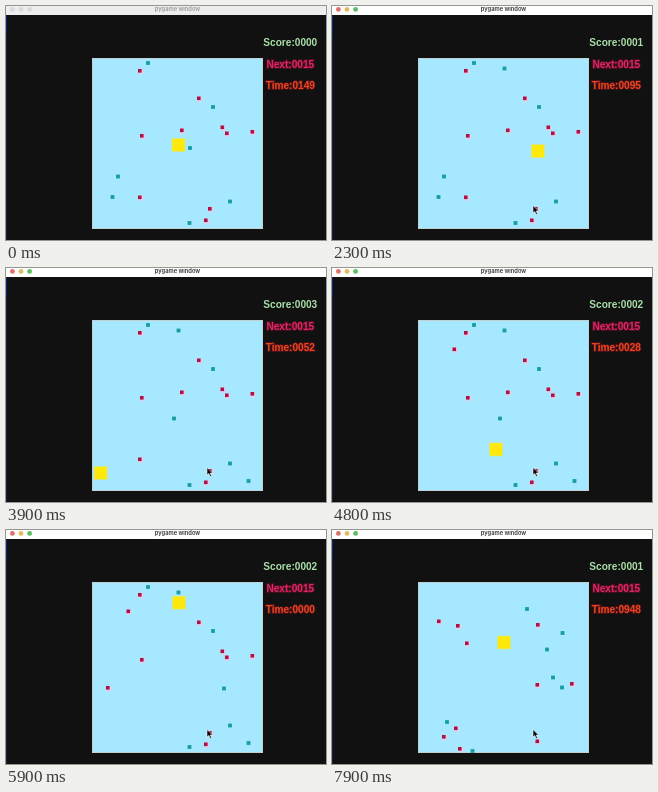
An HTML page that plays this animation: 320 by 234 pixels, repeating every 8 s.

```html
<!DOCTYPE html>
<html lang="en">
<head>
<meta charset="utf-8">
<title>pygame window</title>
<style>
  html, body { margin: 0; width: 100%; height: 100%; overflow: hidden; background: #111; }
  svg { display: block; width: 100vw; height: 100vh; }
  .hud { font: bold 10.1px "Liberation Sans", Arial, sans-serif; text-anchor: middle; }
  .glow { paint-order: stroke; stroke: #d01030; stroke-opacity: .3; stroke-width: 1.8px; }
  .title { font: 600 5.75px Inter, sans-serif; text-anchor: middle; }
</style>
</head>
<body>
<svg viewBox="0 0 320 234">
  <rect width="320" height="234" fill="#111"/>
  <rect y="9" width="1" height="225" fill="#15223a"/>
  <rect y="10" width="1" height="18" fill="#0c2a7c"/>
  <rect id="bar" width="320" height="9"/>
  <g id="lights"></g>
  <text id="title" class="title" x="171.5" y="4.9">pygame window</text>
  <rect x="86.5" y="52.5" width="170" height="170" fill="#a5e8ff" stroke="#c2d0d4"/>
  <g id="items"></g>
  <rect id="player" x="-6.2" y="-6.2" width="12.4" height="12.4"
        fill="#ffe80c" stroke="#ffe80c" stroke-opacity=".4" stroke-width="1.4"/>
  <text id="score" class="hud" x="284.3" y="40.4" fill="#a9e0a9"/>
  <text class="hud glow" x="284.3" y="61.8" fill="#e0246f">Next:0015</text>
  <text id="clock" class="hud glow" x="284.3" y="83" fill="#e8481c"/>
  <path id="cursor" d="M0 0V7.6L1.8 6L3.1 9L4.5 8.4L3.2 5.6H5.6Z"
        fill="#000" stroke="#fff" stroke-width=".6"/>
</svg>
<script>
const LOOP = 8000, STEP = 100, TICK = 20;
const FOCUS = 1400, RESTART = 6000;
const SPEED = 0.107;   // player, px per ms
const PACE = 0.02675;  // countdown, units per ms
const REACH = 8.75;    // half player plus half item

const SVG = "http://www.w3.org/2000/svg";
const $ = id => document.getElementById(id);

// The player walks the route at constant speed; eaten items move to the next spare spot.
const games = [
  {
    start: 0, depart: 1930,
    route: "M172.5 139H206V165H108V205H93V183.5H164V140H173V72",
    good: "142,57 207,101 224,195.5 183.5,217 184,142 112,170.5 106.5,191",
    goodSpare: "172.5,62.5 168,150.5 242.5,213 218,158.5",
    bad: "134,65 193,92.5 136,130 216.5,121.5 221,127.5 246.5,126 200,214.5 204,203 134,191.5 176,124.5",
    badSpare: "122.5,81.5 102,158",
    // The window lags until it has been clicked.
    clock: t => Math.min(Math.max(149.4 - t * 0.0238, 111.4), (5864 - t) * PACE)
  },
  {
    start: RESTART, depart: 6165,
    route: "M172.5 139V112H147V127.5H134.5V140H149V153H172V112.5",
    good: "215,119.5 221,147.5 230,157.5 115,192 140.5,221 160,110 131,129.5",
    goodSpare: "195,79 230.5,103",
    bad: "107,91.5 126,96 135,113.5 205.5,155 240,154 124,198.5 112,207 128,219 205.5,211.5 149.5,157",
    badSpare: "206,95",
    clock: t => 1000 - (t - 5980) * PACE
  }
];

const points = text => text.split(" ").map(pair => {
  const [x, y] = pair.split(",").map(Number);
  return { x, y };
});

// Plays one game up to its end and returns a snapshot for every step.
function simulate(game, end) {
  const path = document.createElementNS(SVG, "path");
  path.setAttribute("d", game.route);
  const kinds = [
    { items: points(game.good), spare: points(game.goodSpare), worth: 1 },
    { items: points(game.bad), spare: points(game.badSpare), worth: -1 }
  ];
  const shots = [];
  let score = 0;
  for (let t = game.start; t < end; t += TICK) {
    const player = path.getPointAtLength(Math.max(0, t - game.depart) * SPEED);
    for (const { items, spare, worth } of kinds) {
      items.forEach((item, i) => {
        const near = Math.max(Math.abs(item.x - player.x), Math.abs(item.y - player.y)) < REACH;
        if (near && spare.length) {
          items[i] = spare.shift();
          score += worth;
        }
      });
    }
    if (t % STEP === 0) {
      const clock = Math.max(0, Math.floor(game.clock(t)));
      shots.push({ player, score, clock, items: kinds.flatMap(kind => kind.items) });
    }
  }
  return shots;
}
const shots = [...simulate(games[0], RESTART), ...simulate(games[1], LOOP)];

const place = (node, { x, y }) => node.setAttribute("transform", `translate(${x} ${y})`);
const digits = n => String(n).padStart(4, "0");
const square = (min, size, fill) =>
  `<rect x="${min}" y="${min}" width="${size}" height="${size}" fill="${fill}"/>`;

function add(parent, markup) {
  const node = document.createElementNS(SVG, "g");
  node.innerHTML = markup;
  return $(parent).appendChild(node);
}
const goodLook = square(-1.9, 3.8, "#169ca6");
const badLook = square(-2.1, 5.3, "#e0cfec") + square(-2, 3.6, "#ac1243");
const goodCount = points(games[0].good).length;
const itemNodes = shots[0].items.map((_, i) => add("items", i < goodCount ? goodLook : badLook));
const lights = ["#e0706b", "#e3bb5c", "#5cbd62"].map((color, i) => ({
  color,
  node: add("lights", `<circle cx="${6.4 + i * 8.6}" cy="3.4" r="2.4"/>`)
}));

function draw(t) {
  const shot = shots[Math.floor(t / STEP)];
  shot.items.forEach((item, i) => place(itemNodes[i], item));
  place($("player"), shot.player);
  $("score").textContent = "Score:" + digits(shot.score);
  $("clock").textContent = "Time:" + digits(shot.clock);

  const away = Math.min(1, Math.max(0, (FOCUS - t) / 400));
  place($("cursor"), { x: 201 + 130 * away, y: 199.5 - 50 * away });

  const focused = t >= FOCUS;
  $("bar").setAttribute("fill", focused ? "#fff" : "#ededed");
  $("title").setAttribute("fill", focused ? "#333" : "#999");
  lights.forEach(({ node, color }) => node.setAttribute("fill", focused ? color : "#d9d9d9"));
}

const begin = performance.now();
function tick() {
  const t = (performance.now() - begin) % LOOP;
  draw(Math.floor(t / STEP) * STEP);
  requestAnimationFrame(tick);
}
tick();
</script>
</body>
</html>
```
